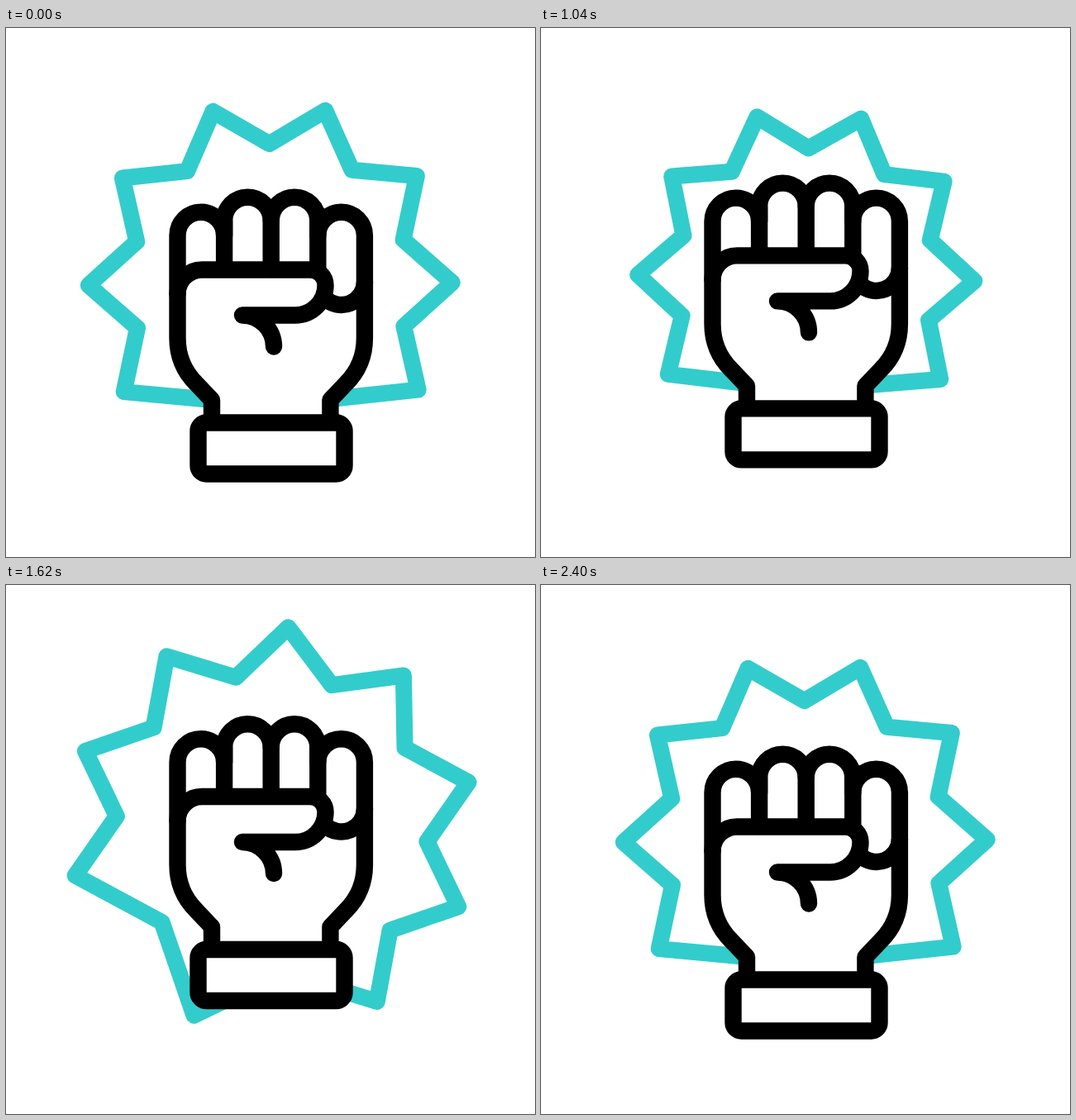
These frames come from a looping animation (640x640 px, 3 s). An HTML page:

```html
<!DOCTYPE html>
<html lang="en">
<head>
<meta charset="utf-8">
<title>Raised fist</title>
<style>
  html, body { margin: 0; width: 100%; height: 100%; overflow: hidden; background: #fff; }
  svg { display: block; width: 100vw; height: 100vh; }
</style>
</head>
<body>
<svg viewBox="0 0 640 640" fill="none" stroke-width="20.4" stroke-linecap="round" stroke-linejoin="round">
  <path id="burst" stroke="#33cccc" stroke-width="20"/>
  <g id="fist" stroke="#000">
    <path id="hand" fill="#fff" stroke-linecap="butt"/>
    <path id="gaps"/>
    <path id="pinky" stroke-linecap="butt" d="M434 307A28.3 28.3 0 0 1 386 327"/>
    <path id="thumb" d="M207.5 322A29.5 29.5 0 0 1 237 292.5H368A18.5 18.5 0 0 1 386.5 311
      A36.5 36.5 0 0 1 350 347.5H286A38 38 0 0 1 324 385.5"/>
    <rect id="cuff" x="232.5" y="477.5" width="177" height="62" rx="10" fill="#fff"/>
  </g>
</svg>
<script>
  const LOOP = 3000;
  const LEFT = 207.5, FINGER = 56.6, MIDDLE = LEFT + 2 * FINGER;
  const $ = id => document.getElementById(id);
  const burst = $('burst'), fist = $('fist');

  // Hand outline: mirrored wrist curves joined by four knuckle arcs.
  function handPath() {
    const side = dir => {
      const x = d => MIDDLE + dir * d;
      return { cuff: `${x(71.7)} 477.5`, wrist: `${x(71.7)} 450`, heel: `${x(90.7)} 430`,
               bend: `${x(104.7)} 416`, rise: `${x(113.2)} 398`, palm: `${x(113.2)} 375` };
    };
    const l = side(-1), r = side(1);
    const knuckles = [251, 233, 233, 251].map((y, i) =>
      `L${LEFT + i * FINGER} ${y}a${FINGER / 2} ${FINGER / 2} 0 0 1 ${FINGER} 0`).join('');
    return `M${l.cuff}L${l.wrist}L${l.heel}C${l.bend} ${l.rise} ${l.palm}${knuckles}` +
           `L${r.palm}C${r.rise} ${r.bend} ${r.heel}L${r.wrist}L${r.cuff}`;
  }
  $('hand').setAttribute('d', handPath());
  $('gaps').setAttribute('d', [1, 2, 3].map(i => `M${LEFT + i * FINGER} 233V292`).join(''));

  // Eased steps: each [time, value] is reached smoothly from the one before.
  function ease(t, ...keys) {
    let [t0, v] = keys[0];
    for (const [t1, next] of keys.slice(1)) {
      const u = Math.min(1, Math.max(0, (t - t0) / (t1 - t0)));
      if (u < 1) return v + (next - v) * u * u * (3 - 2 * u);
      [t0, v] = [t1, next];
    }
    return v;
  }

  // Even tips and notches, with one wider spike at the bottom.
  function burstPath(cx, cy, size, turn) {
    let d = '';
    for (let i = 0; i < 18; i++) {
      const deg = i < 15 ? i * 18 - 36 : 216 + (i - 14) * 27;
      const r = size * (i % 2 === 0 ? 220 : i < 15 ? 169.5 : 157);
      const a = (turn - deg) * Math.PI / 180;
      d += `${i ? 'L' : 'M'}${(cx + r * Math.cos(a)).toFixed(2)} ${(cy + r * Math.sin(a)).toFixed(2)}`;
    }
    return d + 'Z';
  }

  function draw(t) {
    const drop = ease(t, [205, 0], [690, 51.7], [1315, -64.5], [1985, 0]);
    const size = ease(t, [200, 1], [865, 0.819], [1405, 1.246], [1900, 0.914], [2400, 1]);
    const turn = ease(t, [200, -0.4], [850, -15], [1390, 41], [1980, -13], [2400, -0.4]);
    const pulse = ease(t, [850, 0], [1390, 1], [1900, 0]);
    burst.setAttribute('d', burstPath(319.8 + 3.2 * pulse, 309.6 - 25.5 * pulse, size, turn));
    fist.setAttribute('transform', `translate(0 ${drop.toFixed(2)})`);
  }

  const start = performance.now();
  function tick() {
    draw((performance.now() - start) % LOOP);
    requestAnimationFrame(tick);
  }
  draw(0);
  requestAnimationFrame(tick);
</script>
</body>
</html>
```
